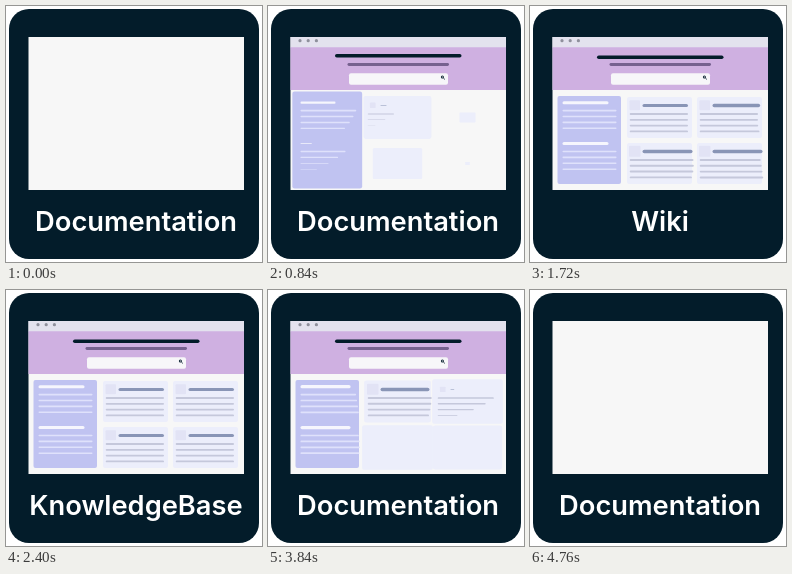
Animation of 256 by 256 pixels, one loop 5000 ms. Source, as an HTML page with a canvas:

```html
<!DOCTYPE html>
<html lang="en">
<head>
<meta charset="utf-8">
<style>
  html, body { margin: 0; width: 100%; height: 100%; overflow: hidden; background: #fff; }
  canvas { display: block; width: 256px; height: 256px; }
</style>
</head>
<body>
<canvas width="256" height="256"></canvas>
<script>
const ctx = document.querySelector('canvas').getContext('2d');
const LOOP = 5000, GROW = 720;
const NAVY = '#031c2a';
let now = 0;

const progress = (start, length) => Math.min(1, Math.max(0, (now - start) / length));

// Ease-out with about 10% overshoot
function grow(start) {
  const u = progress(start, GROW) - 1;
  return Math.max(0, 1 + 2.70158 * u ** 3 + 1.70158 * u ** 2);
}

// Remaining vertical distance of a part that drops in from above
const drop = (start, length) => -62 * (1 - progress(start, length)) ** 3;

function box(x, y, w, h, r, color) {
  ctx.fillStyle = color;
  ctx.beginPath();
  ctx.roundRect(x, y, w, h, r);
  ctx.fill();
}

function dot(x, y, r, color) {
  ctx.fillStyle = color;
  ctx.beginPath();
  ctx.arc(x, y, r, 0, 7);
  ctx.fill();
}

// Scales from its centre
function tile(x, y, w, h, r, color, start) {
  const s = grow(start);
  if (s) box(x + w * (1 - s) / 2, y + h * (1 - s) / 2, w * s, h * s, r * s, color);
}

// Scales from its left end
function bar(x, y, w, h, color, start) {
  const s = grow(start);
  if (s) box(x, y - h * s / 2, w * s, h * s, h * s / 2, color);
}

function sidebar() {
  tile(27.5, 90, 63.5, 88, 2, '#c0c3f1', 420);
  [[96.7, 680, 550, 36], [137.6, 800, 655, 45]].forEach(([y, head, first, step]) => {
    bar(32.5, y, 46, 3, '#f6f6fd', head);
    for (let i = 0; i < 4; i++) bar(32.5, y + 7.9 + i * 5.9, 54, 1.6, '#dfe1fb', first + i * step);
  });
}

function card(x, y, start, icon, head, first, step) {
  tile(x, y, 65, 41, 2, '#eceefb', start);
  tile(x + 2.5, y + 3.3, 10.5, 10, 1, '#e2e3f5', icon);
  bar(x + 15.5, y + 8.5, 45.5, 3.2, '#8995b6', head);
  for (let i = 0; i < 4; i++) bar(x + 2.7, y + 17 + i * 5.8, 58.3, 1.8, '#c5c8db', first + i * step);
}

function header() {
  const top = drop(270, 400);
  box(22, 41 + top, 216, 43, 0, '#cfb0e1');

  const search = drop(265, 520);
  box(81, 67.3 + search, 99, 11.5, 2, '#f7f6f9');
  dot(174.4, 71 + search, 1.5, NAVY);
  dot(174.4, 71 + search, 0.7, '#b9bcc4');
  ctx.strokeStyle = NAVY;
  ctx.lineWidth = 0.9;
  ctx.beginPath();
  ctx.moveTo(175.4, 72 + search);
  ctx.lineTo(176.8, 73.4 + search);
  ctx.stroke();

  box(79.5, 57.1 + drop(340, 550), 101.5, 2.9, 1.45, '#76618f');
  box(67, 49.5 + drop(328, 720), 126.5, 3.5, 1.75, NAVY);

  box(22, 31 + top, 216, 10.2, 0, '#e3e2ee');
  for (const x of [32, 40.2, 48.4]) dot(x, 34.7 + top, 1.6, '#8f909c');
}

function draw() {
  const t = performance.now() % LOOP;
  now = Math.min(t, LOOP - t);

  ctx.clearRect(0, 0, 256, 256);
  box(3, 3, 250, 250, 20, NAVY);
  box(22.5, 31, 215.5, 153, 0, '#f7f7f7');

  ctx.save();
  ctx.beginPath();
  ctx.rect(22.5, 31, 215.5, 153);
  ctx.clip();
  sidebar();
  card(97, 91, 540, 740, 820, 760, 30);
  card(97, 137, 680, 1290, 1310, 1260, 45);
  card(167, 91, 800, 1060, 1146, 915, 62);
  card(167, 137, 830, 1236, 1300, 1146, 33);
  if (now >= 280) header();
  ctx.restore();

  ctx.fillStyle = '#fff';
  ctx.font = '600 27.3px Inter, sans-serif';
  ctx.textAlign = 'center';
  ctx.fillText(now < 1160 ? 'Documentation' : now < 1800 ? 'Wiki' : 'KnowledgeBase', 130, 224.5);
  requestAnimationFrame(draw);
}
draw();
</script>
</body>
</html>
```
